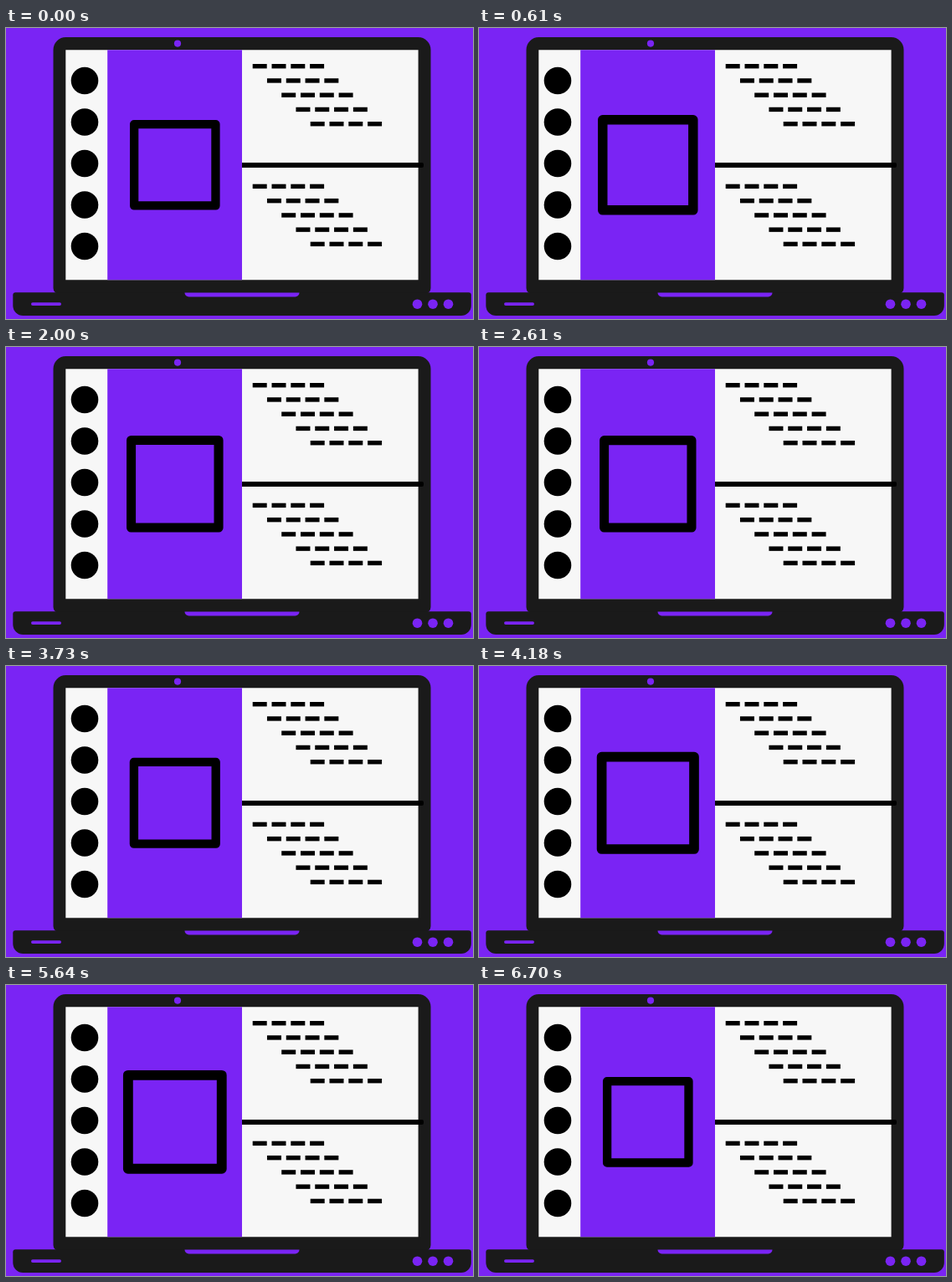
An HTML page with a canvas for the animation above (6.91 s loop, 558 by 348 pixels).

```html
<!DOCTYPE html>
<html lang="en">
<head>
<meta charset="utf-8">
<title>Laptop pulse</title>
<style>
  html, body { margin: 0; width: 100%; height: 100%; overflow: hidden; background: #7a24f4; }
  canvas { display: block; }
</style>
</head>
<body>
<canvas id="stage" width="558" height="348"></canvas>
<script>
const ctx = document.getElementById('stage').getContext('2d');
const PURPLE = '#7a24f4', SHELL = '#1a1a1a', PAPER = '#f7f7f7', INK = '#000';
const LOOP = 6910, PEAK = 0.24, GROWTH = 0.152;
const BEATS = [
  { start: 20, end: 1340 },
  { start: 1865, end: 3035 },
  { start: 3720, end: 5125 },
  { start: 5285, end: 6705 },
];

// Rectangle given by its left, top, right and bottom edges.
function box(left, top, right, bottom, color, radius = 0) {
  ctx.fillStyle = color;
  ctx.beginPath();
  ctx.roundRect(left, top, right - left, bottom - top, radius);
  ctx.fill();
}

function dot(x, y, r, color) {
  ctx.fillStyle = color;
  ctx.beginPath();
  ctx.arc(x, y, r, 0, Math.PI * 2);
  ctx.fill();
}

// Five rows of four dashes, each row stepping right and down.
function codeBlock(left, top) {
  const step = 17.25;
  for (let row = 0; row < 5; row++) {
    for (let col = 0; col < 4; col++) {
      const x = left + row * step + col * 22.8, y = top + row * step;
      box(x, y, x + 17, y + 5.4, INK);
    }
  }
}

function laptop() {
  box(0, 0, 558, 348, PURPLE);
  box(56.5, 11, 507.5, 318, SHELL, [15, 15, 7, 7]);
  box(8.3, 316.3, 555.8, 344, SHELL, [3, 3, 12, 12]);
  box(213.5, 316.5, 350.5, 321.5, PURPLE, [0, 0, 5, 5]);
  box(30, 328.2, 66, 332, PURPLE, 2);
  for (let i = 0; i < 3; i++) dot(491.5 + i * 18.5, 330.2, 5.8, PURPLE);
  dot(205, 18.6, 4.1, PURPLE);
}

function screen() {
  const top = 26.3, bottom = 301.2;
  box(71.3, top, 492.6, bottom, PAPER);
  box(121.2, top, 282, bottom, PURPLE);
  for (let i = 0; i < 5; i++) dot(94, 63 + i * 49.5, 16.3, INK);
  codeBlock(294.7, 43);
  codeBlock(294.7, 186.7);
  box(282, 161, 499, 167, INK, [0, 2, 2, 0]);
}

// Quick linear swell, then a longer linear release.
function pulse(t) {
  const beat = BEATS.find(b => t >= b.start && t <= b.end);
  if (!beat) return 1;
  const p = (t - beat.start) / (beat.end - beat.start);
  return 1 + GROWTH * Math.min(p / PEAK, (1 - p) / (1 - PEAK));
}

function frame(scale) {
  const outer = 53.8 * scale, inner = 43.5 * scale;
  ctx.fillStyle = INK;
  ctx.beginPath();
  ctx.roundRect(201.8 - outer, 163.8 - outer, 2 * outer, 2 * outer, 5 * scale);
  ctx.rect(201.8 - inner, 163.8 - inner, 2 * inner, 2 * inner);
  ctx.fill('evenodd');
}

const began = performance.now();

function draw() {
  laptop();
  screen();
  frame(pulse((performance.now() - began) % LOOP));
  requestAnimationFrame(draw);
}
draw();
</script>
</body>
</html>
```
